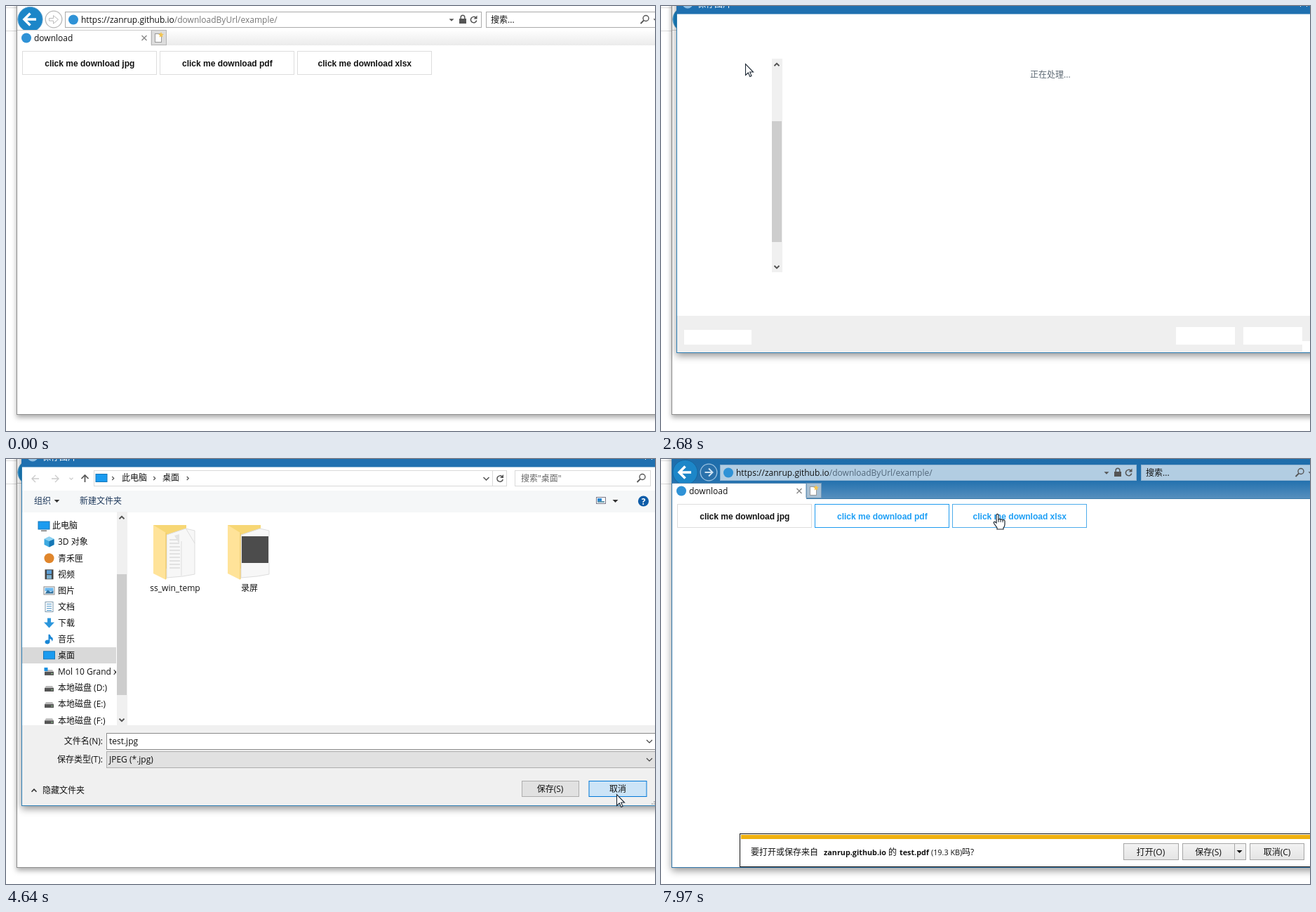
An HTML page for the animation above (8000 ms loop, 925 by 605 pixels).

```html
<!DOCTYPE html>
<html lang="zh-CN">
<head>
<meta charset="utf-8">
<title>download</title>
<style>
html, body { margin: 0; width: 100%; height: 100%; overflow: hidden; background: #fff; }
svg { display: block; }
text { font: 12px "Open Sans", "Noto Sans CJK SC", "Noto Sans CJK", sans-serif; white-space: pre; }
.btn { font: bold 12px "Liberation Sans", Arial, sans-serif; }
.small { font-size: 10.8px; }
.bold { font-weight: bold; }
</style>
</head>
<body>
<svg id="stage" width="925" height="605" viewBox="0 0 925 605"></svg>
<script>
const LOOP = 8000, BLUE = '#0078d7';

// drawing helpers
const rect = (x, y, w, h, fill, stroke, extra = '') =>
  `<rect x="${x}" y="${y}" width="${w}" height="${h}" fill="${fill}" stroke="${stroke || 'none'}" ${extra}/>`;
const text = (x, y, s, fill = '#111', extra = '') => `<text x="${x}" y="${y}" fill="${fill}" ${extra}>${s}</text>`;
const mid = (x, y, s, fill, extra = '') => text(x, y, s, fill, 'text-anchor="middle" ' + extra);
const line = (d, stroke, w = 1, extra = '') =>
  `<path d="${d}" fill="none" stroke="${stroke}" stroke-width="${w}" ${extra}/>`;
const fill = (d, color, extra = '') => `<path d="${d}" fill="${color}" ${extra}/>`;
const dot = (x, y, r, color, extra = '') => `<circle cx="${x}" cy="${y}" r="${r}" fill="${color}" ${extra}/>`;
const group = (id, body, extra = '') => `<g id="${id}" ${extra}>${body}</g>`;
const chevron = (x, y, angle, color, s = 3, w = 1.2) =>
  line(`M${-s / 2} ${-s}L${s / 2} 0L${-s / 2} ${s}`, color, w, `transform="translate(${x} ${y}) rotate(${angle})"`);
const caret = (x, y, color, s = 4) => fill(`M${x - s} ${y - s / 2}h${2 * s}l${-s} ${s}z`, color);
const lens = (x, y, color) =>
  line(`M${x - 2} ${y + 2}l-4.5 4.5`, color, 1.8) + dot(x + 1, y - 1, 4, 'none', `stroke="${color}" stroke-width="1.4"`);
const reload = (x, y, color) =>
  line(`M${x + 3} ${y - 3}A4.2 4.2 0 1 0 ${x + 4.2} ${y + 1}`, color, 1.5) + fill(`M${x + 5} ${y - 6}v5h-5z`, color);
const arrow = (x, y, angle, color, s, w) =>
  line(`M${-s} 0H${s}M0 ${-s}L${s} 0L0 ${s}`, color, w, `transform="translate(${x} ${y}) rotate(${angle})"`);

const buttons = [
  { x: 23, label: 'jpg', hover: 1830, press: 2450, off: 5640 },
  { x: 219, label: 'pdf', hover: 5310, press: 5640, off: 1e5 },
  { x: 415, label: 'xlsx', hover: 7790, press: 1e5, off: 1e5 }
];

function browserFrame(on) {
  const edge = on ? '#2f74a8' : '#8c8c8c';
  const field = on ? '#b2cde2' : '#fff';
  const rim = on ? '#8fb3d0' : '#aaa';
  const fwd = on ? '#9cc3e2' : '#b8b8b8';
  return rect(15.5, -30, 960, 611.5, '#fff', edge, `filter="url(#${on ? 'deep' : 'soft'})"`) +
    rect(16, 0, 909, 56, `url(#${on ? 'barOn' : 'barOff'})`) +
    (on ? line('M207 56.5H925', '#3d7cab') : '') +
    dot(34.5, 19, 17.6, '#1c86c8', `stroke="${on ? '#16669f' : '#5ea0cc'}"`) + arrow(34.5, 19, 180, '#fff', 8.5, 3.6) +
    dot(68, 19, 11.8, on ? '#2a71ab' : '#fff', `stroke="${fwd}" stroke-width="1.3"`) +
    (on ? arrow(68, 19, 0, '#cfe3f2', 5.5, 2)
      : line('M61.5 17.5h6v-4l7 5.8l-7 5.8v-4h-6z', '#bbb')) +
    rect(84.5, 8.5, 593, 22, field, rim) + rect(684.5, 8.5, 260, 22, field, rim) +
    dot(96, 19.5, 7, '#2f92d6') +
    text(107, 24, `https://zanrup.github.io<tspan fill="${on ? '#52677a' : '#777'}">/downloadByUrl/example/</tspan>`) +
    caret(635, 20, '#555', 3.5) +
    rect(646, 18, 10, 7, '#555') + line('M648.2 18v-2a2.8 2.8 0 0 1 5.6 0v2', '#555', 1.5) +
    reload(666.5, 19.5, '#555') + text(691, 24, '搜索...') + lens(911, 18.5, '#555') + caret(926, 20, '#555', 3.5) +
    rect(15.5, 34.5, 191.5, 22, '#fff', on ? '#5388b3' : '#ccc') + rect(16, 55, 191, 3, '#fff') +
    dot(29, 45.5, 7, '#2f92d6') + text(40, 50, 'download') +
    line('M193.5 42l7 7m0-7l-7 7', '#888', 1.4) +
    rect(207.5, 34.5, 21, 21, on ? '#a8c0d4' : '#dcdcdc', on ? '#6d96b8' : '#b5b5b5') +
    rect(212.5, 39.5, 9, 12, '#fff', '#999') + fill('M221 37l1.2 2.6l2.8.4l-2.2 1.8l.6 2.8l-2.4-1.4l-2.4 1.4l.6-2.8l-2.2-1.8l2.8-.4z', '#f3c552') +
    line(`M15.5 0V581.5H925`, edge);
}

function pageButtons() {
  return buttons.map((b, i) => group('b' + i,
    rect(b.x + .5, 64.5, 191, 33, '#fff', 'inherit') + mid(b.x + 96.3, 86, 'click me download ' + b.label, 'inherit', 'class="btn" stroke="none"')
      .replace('fill="inherit"', '')).replace('stroke="inherit"', '')).join('');
}

function notice() {
  const box = (x, w) => rect(x + .5, 547.5, w, 23, 'url(#key)', '#a6a6a6');
  return rect(112.5, 533.5, 840, 47, '#fff', '#111') + rect(114, 535, 811, 6, '#efb00e') +
    text(128, 564, '要打开或保存来自') + text(232, 564, 'zanrup.github.io', '#111', 'class="small bold"') + text(324, 564, '的') +
    text(340, 564, 'test.pdf', '#111', 'class="small bold"') + text(385, 564, '(19.3 KB)', '#111', 'class="small"') + text(429, 564, '吗?') +
    box(659, 78) + box(743, 90) + box(839, 77) + line('M817.5 548v23', '#a6a6a6') + caret(824.5, 559, '#111') +
    mid(698, 564, '打开(O)') + mid(780, 564, '保存(S)') + mid(878, 564, '取消(C)');
}

// small tree icons, drawn around their centre
const screen = (s = 0) => rect(-8, -6, 16, 11, '#1a9bf0', '#1676b8') + (s ? rect(-4, 6.5, 8, 1.5, '#777') : '');
const disk = rect(-6.5, 0, 13, 5, '#555') + fill('M-6.5 0l2-3h9l2 3z', '#bbb') + rect(3, 2, 2, 1.2, '#9fe0a0');
const icons = [
  screen(1),
  fill('M-7-4l7-3.5l7 3.5v8l-7 3.5l-7-3.5z', '#3da9e0') + fill('M0-1l7-3v8l-7 3.5z', '#1677b5') + fill('M-7-4l7-3.5l7 3.5l-7 3z', '#8fd3f2'),
  dot(0, 0, 7, '#e0862c'),
  rect(-6, -7, 12, 14, '#444') + rect(-3.5, -6, 7, 5.5, '#5b9fd8') + rect(-3.5, .8, 7, 5.5, '#7eb0cf'),
  rect(-7.5, -5.5, 15, 11, '#fff', '#888') + rect(-6, -4, 12, 5, '#6cb8ee') + fill('M-6 4l4-5l4 3l4-2v4z', '#32729e'),
  rect(-5.5, -7, 11, 14, '#fff', '#7d99ad') + line('M-3.5-4h7m-7 3h7m-7 3h7m-7 3h7', '#4a94c8'),
  fill('M-2.5-7h5v6h5l-7.500 8l-7.500-8h5z', '#2b96dc'),
  fill('M-1-7h2q1 3 4 5q1 3-1 5q0-3-3-4v5a3.500 3 0 1 1-2-3z', '#1a87d6'),
  screen(),
  disk + rect(-7, -6, 5, 5, '#1a8fe0'), disk, disk, disk
];
const names = ['此电脑', '3D 对象', '青禾匣', '视频', '图片', '文档', '下载', '音乐', '桌面', 'Mol 10 Grand x64',
  '本地磁盘 (D:)', '本地磁盘 (E:)', '本地磁盘 (F:)'];

function tree() {
  const rowY = i => 95 + i * 23.1;
  const marks = names.map((n, i) => i ? chevron(41, rowY(i), 0, '#a0a0a0', 3.5) : chevron(33, 95, 90, '#777', 3.5)).join('');
  return rect(23, 268, 134, 23, '#d9d9d9') + group('marks', marks) +
    names.map((n, i) => `<g transform="translate(${i ? 61.5 : 54} ${rowY(i)})">${icons[i]}</g>` +
      text(i ? 74 : 66, rowY(i) + 4.3, n)).join('');
}

function folder(x, inner, label) {
  return `<g transform="translate(${x} 93)">` + fill('M0 1h47v62H0z', '#f7d775') + inner +
    fill('M0 1l18 11v67L0 70z', '#ffe399') + line('M18 12v66', '#e9c25f') + '</g>' + mid(x + 31, 188, label);
}

function dialogBody() {
  const paper = fill('M19 15l27-9l13 3v62l-17 3l-23 2z', '#f7f7f7', 'stroke="#ddd"');
  const lines = line('M23 22h14m-14 5h14m-14 5h15m-15 5h15m-15 5h15m-15 5h15m-15 5h15m-15 5h15m-15 5h15', '#ccc') +
    line('M40 24v49M47 7l12 20', '#ddd') + fill('M30 16l7-2v14z', '#e3e3e3');
  const field = rect(125.5, 16.5, 588, 22, '#fff', '#d9d9d9') + rect(725.5, 16.5, 193, 22, '#fff', '#d9d9d9');
  return rect(23, 12, 902, 33, '#fff') + arrow(42, 28, 180, '#ccc', 5, 1.4) + arrow(70, 28, 0, '#ccc', 5, 1.4) +
    chevron(93, 28, 90, '#ccc', 2.5) + arrow(112.5, 28, -90, '#555', 5, 1.7) + field + line('M693.5 17v21', '#d9d9d9') +
    `<g transform="translate(136 27.500)">${screen()}</g>` +
    [152.5, 211.5, 259].map(x => chevron(x, 27.5, 0, '#555', 2.5)).join('') +
    text(165, 31, '此电脑') + text(223, 31, '桌面') + chevron(684.5, 28, 90, '#555', 4, 1.5) + reload(704, 28, '#555') +
    text(734, 32, '搜索"桌面"', '#666') + lens(906, 26.5, '#555') +
    rect(23, 45, 902, 31, '#f5f7f8') + text(40, 64, '组织', '#1e395b') + caret(72.5, 60, '#333', 3.8) + text(105, 64, '新建文件夹', '#1e395b') +
    rect(841.5, 54.5, 13, 9, '#fff', '#778') + rect(843, 56, 6, 4, '#2a86d1') + rect(843, 60, 10, 2, '#69a') + caret(868.5, 60, '#333', 4) +
    dot(908.5, 60, 7.6, '#0d5ca8') + mid(908.5, 64.5, '?', '#fff', 'class="bold"') +
    rect(174, 76, 751, 303, '#fff') + `<g clip-path="url(#treeClip)">${tree()}</g>` +
    folder(210, paper + lines, 'ss_win_temp') + folder(316, paper + rect(20, 17, 38, 38, '#4c4c4c'), '录屏') +
    rect(23, 379, 902, 114, '#f0f0f0') +
    text(138, 405.5, '文件名(N):', '#111', 'text-anchor="end"') + text(138, 432, '保存类型(T):', '#111', 'text-anchor="end"') +
    rect(143.5, 390.5, 800, 23, '#fff', BLUE, 'id="nameBox"') + rect(147, 393, 42, 17, BLUE, '', 'id="pick"') +
    text(147, 405.5, 'test.jpg', '#fff', 'id="nameText"') +
    rect(143.5, 416.5, 800, 23, '#dfe8ec', '#8ba7b8', 'id="typeBox"') + text(147, 432, 'JPEG (*.jpg)') +
    chevron(917, 402, 90, '#444', 4) + chevron(917, 428, 90, '#444', 4) +
    chevron(40, 472, -90, '#333', 3.5, 1.6) + text(52, 476, '隐藏文件夹') +
    rect(735.5, 458.5, 81, 22, '#e1e1e1', BLUE, 'id="save" stroke-width="2"') + mid(775.5, 473.5, '保存(S)') +
    rect(831, 458.5, 82, 22, '#e1e1e1', '#adadad', 'id="cancel"') + mid(872, 473.5, '取消') +
    [[923, 487], [920, 490], [923, 490]].map(p => rect(p[0], p[1], 2, 2, '#bbb')).join('');
}

function dialog() {
  const blank = rect(33, 461, 96, 21, '#fff') + rect(734, 457, 84, 25, '#fff') + rect(830, 457, 84, 25, '#fff') + rect(914, 477, 11, 15, '#fff');
  const scroll = rect(158, 75, 15, 304, '#f0f0f0') + rect(158, 164, 14, 172, '#cdcdcd') +
    chevron(165, 83.5, -90, '#505050', 3.5, 1.8) + chevron(165, 371.5, 90, '#505050', 3.5, 1.8);
  return rect(22.5, -30, 940, 523.5, '#fff', '#2f7fb5', 'filter="url(#deep)"') + rect(22, -2, 903, 13.5, '#1f70b0') +
    dot(38, -4, 7.5, '#8fbfe4') + text(52, 1.5, '保存图片', '#fff') + line('M911 1l5-5l5 5', '#fff') +
    group('bare', rect(23, 441, 902, 52, '#efefef') + blank + scroll + group('wait', text(526, 102, '正在处理...', '#5c6873'))) +
    group('full', dialogBody() + scroll);
}

const cursors = group('arrow', fill('M.5.5V16.500L4.300 13L6.800 18.500L9 17.400L6.700 12H11.500Z', '#fff', 'stroke="#1c2733" stroke-width="1.100"')) +
  group('hand', fill('M-2 1.500Q-.5-.8 1 1.500V8Q2.500 6.500 4 8.300Q5.500 7 7 9Q8.800 8 10 10V15Q10 18 8 20V22H-1V20L-5.500 13.500Q-6.500 11-4 11.500L-2 13Z', '#fff', 'stroke="#1c2733" stroke-width="1.200"') +
    line('M1 8v4M4 8.500v3.500M7 9.200v3', '#1c2733')) +
  group('size', fill('M0-10.500l4.500 5h-3v11h3l-4.500 5l-4.500-5h3v-11h-3z', '#fff', 'stroke="#1d7550"'));

const shadow = (id, o, d) => `<filter id="${id}" x="-5%" y="-5%" width="110%" height="112%"><feDropShadow dx="0" dy="4" stdDeviation="${d}" flood-color="#000" flood-opacity="${o}"/></filter>`;
const grad = (id, ...stops) => `<linearGradient id="${id}" x1="0" y1="0" x2="0" y2="1">` +
  stops.map(s => `<stop offset="${s[0]}" stop-color="${s[1]}"/>`).join('') + '</linearGradient>';

document.getElementById('stage').innerHTML = '<defs>' + shadow('soft', .32, 3.5) + shadow('deep', .42, 5.5) +
  grad('barOn', [0, '#1e6dab'], [.55, '#2371ae'], [1, '#568fbe']) + grad('barOff', [0, '#fff'], [.6, '#fff'], [1, '#ebebeb']) +
  grad('key', [0, '#f3f3f3'], [1, '#e4e4e4']) +
  '<clipPath id="treeClip"><rect x="23" y="76" width="134" height="303"/></clipPath>' +
  '<clipPath id="pageClip"><rect x="16" y="57" width="909" height="524"/></clipPath></defs>' +
  rect(0, 0, 925, 605, '#fff') + line('M0 2.500H15M0 35.500H15', '#d9d9d9') +
  group('idle', browserFrame(false)) + group('active', browserFrame(true)) + pageButtons() +
  `<g clip-path="url(#pageClip)">${group('notice', notice())}</g>` + group('dialog', dialog()) + group('cursor', cursors);

const el = {};
document.querySelectorAll('[id]').forEach(n => el[n.id] = n);
const show = (id, on) => { el[id].style.display = on ? '' : 'none'; };
const clamp = v => Math.max(0, Math.min(1, v));
const mix = (a, b, k) => `rgb(${a.map((v, i) => Math.round(v + (b[i] - v) * k))})`;

const bursts = [0, 70, 110, 450, 1310, 1600, 2450, 3300, 4170, 4410, 4790, 5640, 6500, 7340];
function snap(t) {
  const start = bursts.filter(b => b <= t).pop();
  return start + Math.floor((t - start) / 75) * 75;
}

// time, x, y of the pointer
const path = [
  [70, 668, 522], [110, 543, 444], [450, 535, 436], [800, 350, 270], [1200, 150, 103], [1600, 150, 103],
  [1900, 121, 82], [3000, 120, 82], [3225, 124, 93], [3300, 128, 100], [3375, 150, 130], [3450, 420, 300],
  [3525, 720, 440], [3600, 857, 497], [3740, 857, 497], [4000, 869, 478], [4170, 870, 477], [4865, 870, 477],
  [5165, 520, 240], [5450, 291, 76], [5900, 291, 76], [6390, 303, 248], [6500, 303, 248], [6650, 350, 206],
  [6800, 376, 300], [6950, 318, 450], [7050, 318, 540], [7120, 300, 574], [7250, 228, 548], [7340, 228, 548],
  [7490, 178, 400], [7640, 270, 220], [7780, 410, 115], [7930, 480, 78], [8000, 480, 78]
];
function pointer(t) {
  const i = Math.max(1, path.findIndex(p => p[0] > t));
  const a = path[i - 1], b = path[i], k = clamp((t - a[0]) / (b[0] - a[0]));
  return [1, 2].map(n => Math.round(a[n] + (b[n] - a[n]) * k));
}

function draw(time) {
  const t = snap(time);
  const open = t >= 2525 && t < 4790;
  const active = t >= 1310 && !open;
  show('active', active);
  show('idle', !active);

  buttons.forEach((b, i) => {
    const k = t >= b.off ? 0 : clamp((t - b.hover) / 150);
    const [box, label] = el['b' + i].children;
    box.setAttribute('stroke', mix([221, 221, 221], [30, 155, 240], k * (t >= b.press ? 1 : .75)));
    label.setAttribute('fill', mix([17, 17, 17], [30, 159, 245], k));
  });

  show('notice', t >= 5865);
  el.notice.setAttribute('transform', `translate(0 ${Math.round(48 * (1 - clamp((t - 5790) / 225)))})`);

  show('dialog', open);
  show('bare', t >= 2600);
  show('wait', t >= 2675);
  show('full', t >= 2825);
  el.marks.setAttribute('opacity', t < 3300 ? 0 : t < 3650 ? 1 : clamp((4050 - t) / 400));
  const pressed = t >= 4485;
  show('pick', !pressed);
  el.nameText.setAttribute('fill', pressed ? '#111' : '#fff');
  el.nameBox.setAttribute('stroke', pressed ? '#8a8a8a' : BLUE);
  const warm = t >= 3450 && t < 3675;
  el.typeBox.setAttribute('fill', warm ? '#dfe8ec' : '#e1e1e1');
  el.typeBox.setAttribute('stroke', warm ? '#8ba7b8' : '#adadad');
  el.save.setAttribute('stroke', pressed ? '#adadad' : BLUE);
  el.save.setAttribute('stroke-width', pressed ? 1 : 2);
  el.cancel.setAttribute('fill', pressed ? '#cce4f7' : t >= 4000 ? '#e5f1fb' : '#e1e1e1');
  el.cancel.setAttribute('stroke', t >= 4000 ? BLUE : '#adadad');

  const [x, y] = pointer(t);
  const link = !open && y > 63 && y < 98 && buttons.some(b => x >= b.x && x < b.x + 192);
  const sizing = open && y > 489;
  show('cursor', t >= 70);
  show('hand', link);
  show('size', sizing);
  show('arrow', !link && !sizing);
  el.cursor.setAttribute('transform', `translate(${x} ${y})`);
}

const begin = performance.now();
function tick() {
  draw((performance.now() - begin) % LOOP);
  requestAnimationFrame(tick);
}
draw(0);
tick();
</script>
</body>
</html>
```
